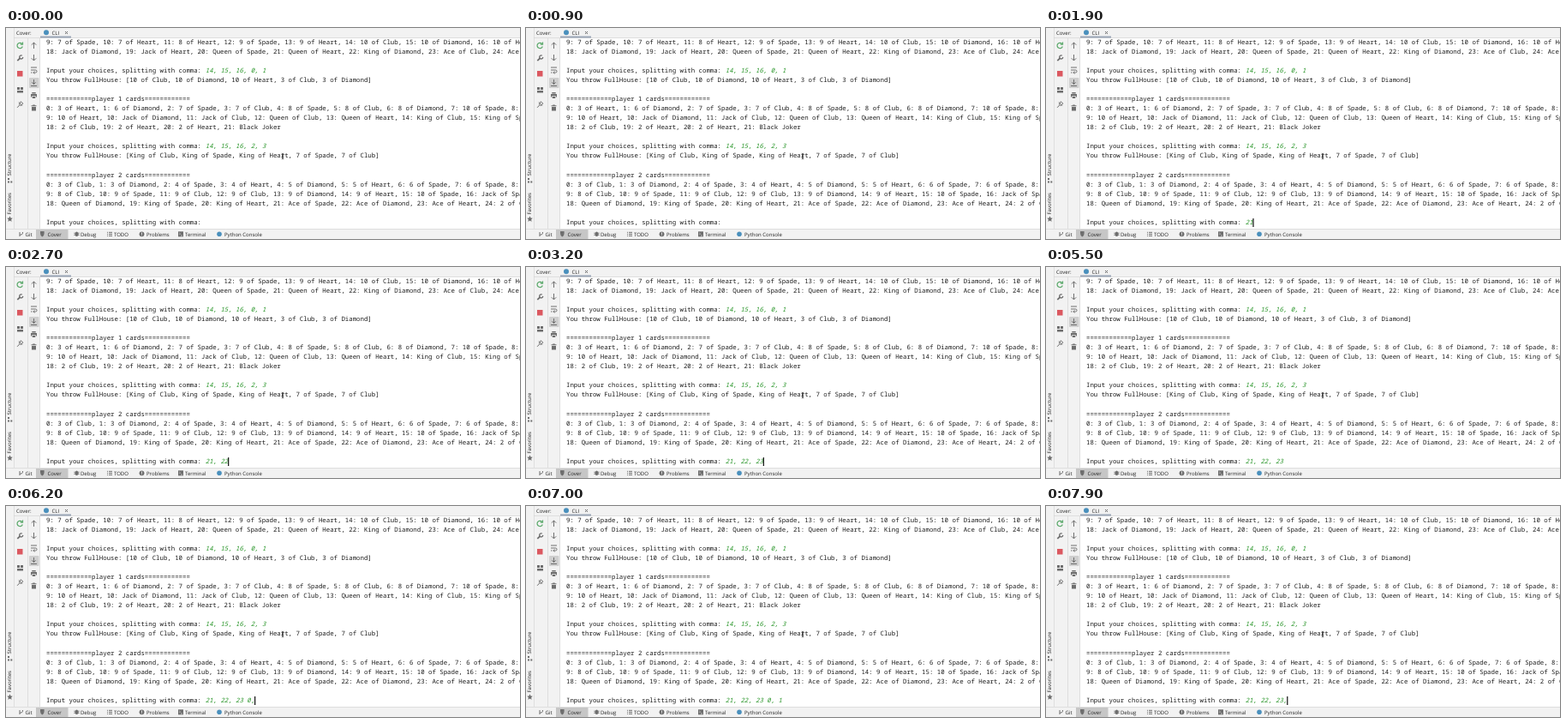
Write an HTML page that moves like this. It is 600 px wide and 246 px high and loops after 8000 ms.

```html
<!DOCTYPE html>
<html lang="en">
<head>
<meta charset="utf-8">
<style>
  html, body { margin: 0; width: 100%; height: 100%; overflow: hidden; background: #f2f2f2; }
  svg { display: block; }
  text { white-space: pre; text-rendering: geometricPrecision; }
  .console { font: 7.37px "Noto Sans Mono", monospace; fill: #1c1c1c; }
  .input { font-style: italic; fill: #259325; }
  .ui { font: 6px "Open Sans", sans-serif; fill: #222; }
  .icon { fill: none; stroke: #6e6e6e; stroke-width: 1; }
  .solid { fill: #6e6e6e; }
</style>
</head>
<body>
<svg width="600" height="246" viewBox="0 0 600 246">
  <rect width="600" height="246" fill="#f2f2f2"/>
  <rect x="40" y="12" width="560" height="222" fill="#fff"/>
  <path d="M9.5 0V234M25.5 12V234M39.5 12V234M9 11.5H600M0 234.5H600" stroke="#d6d6d6" stroke-width=".7"/>

  <!-- Header -->
  <g class="ui">
    <text x="12" y="7.5">Cover:</text>
    <text x="53.5" y="7.5">CLI</text>
    <circle cx="47" cy="5.3" r="3" fill="#4a90bd"/>
    <path class="icon" d="M69 4l3 3m0-3l-3 3" stroke-width=".6"/>
    <rect x="40" y="9.5" width="36" height="2" fill="#9ca7b8"/>
  </g>

  <!-- Run toolbars -->
  <g class="icon">
    <path d="M18.5 18.2A3.2 3.2 0 1 0 19.3 21.5M19.5 16.5v2.7h-2.7" stroke="#59a869" stroke-width="1.2"/>
    <path d="M13.3 38.2l3.4-3.4" stroke-width="1.8"/>
    <path d="M18.8 32.3a2 2 0 1 0 .9 1.6" stroke-width="1.3"/>
    <rect x="13" y="50" width="6.5" height="6.5" fill="#db5860" stroke="none"/>
    <path class="solid" stroke="none" d="M13 69h3v3h-3zM17 69h3v3h-3zM13 73h7v2.5h-7z"/>
    <path d="M15 86.5l4 4M17.4 85.7l2.4 2.4-2.5 2.7-2-2zM15.7 90l-2.6 2.8"/>
    <path d="M32.5 24v-7M29.8 19.7l2.7-2.7 2.7 2.7M32.5 31v7M29.8 35.3l2.7 2.7 2.7-2.7"/>
    <path d="M29 46h7M29 49h5.5a1.5 1.5 0 0 1 0 3H32M33.3 50.5L31.8 52l1.5 1.5M29 52h1.5"/>
    <rect x="27" y="58" width="11.5" height="12" rx="1" fill="#cfcfcf" stroke="none"/>
    <path d="M29 67.5h7M32.5 60v5.5M30.3 63.3l2.2 2.2 2.2-2.2"/>
    <path class="solid" stroke="none" d="M30.3 75h4.4v1.5h-4.4zM29 77h7v3.5h-1.3V79h-4.4v1.5H29zM30.8 79.7h3.4V82h-3.4z"/>
    <path class="solid" stroke="none" d="M29.5 90.3h1.8v-.8h2.4v.8h1.8v1h-6zM30 92h5v4.5h-5z"/>
  </g>

  <!-- Left stripe -->
  <g class="ui">
    <text transform="translate(6.3 172.5) rotate(-90)">Structure</text>
    <text transform="translate(6.3 217.5) rotate(-90)">Favorites</text>
    <path class="solid" d="M2 175h2v2H2zM2 178.5h2v2H2zM5.3 178.5h2v2h-2z"/>
    <path class="solid" d="M4.5 219.3l1 2.2 2.3.2-1.7 1.6.5 2.4-2.1-1.3-2.1 1.3.5-2.4-1.7-1.6 2.3-.2z"/>
  </g>

  <!-- Bottom stripe -->
  <rect x="35" y="235" width="37.5" height="11" fill="#c6c6c6"/>
  <g class="ui">
    <g id="tabs"></g>
    <g class="icon" stroke-width=".9">
      <path d="M16 238v5M19.5 238v1.3q0 1.7-3.5 2"/>
      <path class="solid" stroke="none" d="M40 237h4.6v2.5q0 2.6-2.3 4-2.3-1.4-2.3-4z"/>
      <path class="solid" stroke="none" d="M80.5 239q2-3 4 0v2.5q-2 3-4 0z"/>
      <path d="M79 239.2h7M79 241.3h7" stroke-width=".6"/>
      <path d="M118 238.3h1M120 238.3h4M118 240.3h1M120 240.3h4M118 242.3h1M120 242.3h4"/>
    </g>
    <circle cx="158.5" cy="240.3" r="2.9" fill="#6e6e6e"/>
    <path d="M158.5 238.5v2.2m0 .7v.8" stroke="#f2f2f2" stroke-width=".9"/>
    <rect x="201" y="237.3" width="6" height="6" fill="#6e6e6e"/>
    <path d="M202.2 238.8l1.3 1.2-1.3 1.2M204 242h2" fill="none" stroke="#f2f2f2" stroke-width=".6"/>
    <circle cx="249" cy="240.3" r="2.8" fill="#4a90bd"/>
  </g>

  <g id="console" class="console"></g>
  <rect id="caret" y="222" width="1.2" height="10" fill="#111"/>
  <path d="M321.8 146.2q1.2 0 1.2 1v4.6q0 1-1.2 1M324.2 146.2q-1.2 0-1.2 1v4.6q0 1 1.2 1" fill="none" stroke="#333" stroke-width=".8"/>
</svg>

<script>
const PROMPT = 'Input your choices, splitting with comma: ';
const LEFT = 47, FIRST_BASELINE = 18.6, LINE_HEIGHT = 11.07, ADVANCE = 7.37 * 0.6;
const LOOP = 8000;

const lines = [
  '9: 7 of Spade, 10: 7 of Heart, 11: 8 of Heart, 12: 9 of Spade, 13: 9 of Heart, 14: 10 of Club, 15: 10 of Diamond, 16: 10 of Heart',
  '18: Jack of Diamond, 19: Jack of Heart, 20: Queen of Spade, 21: Queen of Heart, 22: King of Diamond, 23: Ace of Club, 24: Ace of',
  '',
  PROMPT + '|14, 15, 16, 0, 1',
  'You throw FullHouse: [10 of Club, 10 of Diamond, 10 of Heart, 3 of Club, 3 of Diamond]',
  '',
  '============player 1 cards============',
  '0: 3 of Heart, 1: 6 of Diamond, 2: 7 of Spade, 3: 7 of Club, 4: 8 of Spade, 5: 8 of Club, 6: 8 of Diamond, 7: 10 of Spade, 8: 10',
  '9: 10 of Heart, 10: Jack of Diamond, 11: Jack of Club, 12: Queen of Club, 13: Queen of Heart, 14: King of Club, 15: King of Spade',
  '18: 2 of Club, 19: 2 of Heart, 20: 2 of Heart, 21: Black Joker',
  '',
  PROMPT + '|14, 15, 16, 2, 3',
  'You throw FullHouse: [King of Club, King of Spade, King of Heart, 7 of Spade, 7 of Club]',
  '',
  '============player 2 cards============',
  '0: 3 of Club, 1: 3 of Diamond, 2: 4 of Spade, 3: 4 of Heart, 4: 5 of Diamond, 5: 5 of Heart, 6: 6 of Spade, 7: 6 of Spade, 8: 7',
  '9: 8 of Club, 10: 9 of Spade, 11: 9 of Club, 12: 9 of Club, 13: 9 of Diamond, 14: 9 of Heart, 15: 10 of Spade, 16: Jack of Spade',
  '18: Queen of Diamond, 19: King of Spade, 20: King of Heart, 21: Ace of Spade, 22: Ace of Diamond, 23: Ace of Heart, 24: 2 of Club',
  '',
  PROMPT + '|'
];

const tabs = [['Git', 22.5], ['Cover', 48.5], ['Debug', 87], ['TODO', 126], ['Problems', 164],
  ['Terminal', 209], ['Python Console', 255]];

// Time of each keystroke and the number of characters left after it
const DRAFT = '21, 22, 23 0, 1';
const keys = [[0, 0], [1800, 1], [1900, 2], [2100, 3], [2200, 4], [2400, 5], [2500, 6],
  [2800, 7], [2900, 8], [3100, 9], [3200, 10], [3800, 11], [6000, 12], [6200, 13],
  [6400, 14], [6500, 15], [7100, 14], [7200, 13], [7400, 12], [7500, 11], [7700, 10], [7900, 11]];
const hiddenCaret = [[0, 400], [900, 1400], [3700, 3800], [4500, 5000], [5500, 6000], [7000, 7100]];

const byId = id => document.getElementById(id);

function addText(parent, content, x, y, className = '') {
  const node = document.createElementNS('http://www.w3.org/2000/svg', 'text');
  node.setAttribute('x', x);
  node.setAttribute('y', y);
  node.setAttribute('class', className);
  node.textContent = content;
  return parent.appendChild(node);
}

let typed;
lines.forEach((line, row) => {
  const [output, input] = line.split('|');
  const y = FIRST_BASELINE + row * LINE_HEIGHT;
  addText(byId('console'), output, LEFT, y);
  if (input !== undefined) {
    typed = addText(byId('console'), input, LEFT + output.length * ADVANCE, y, 'input');
  }
});
tabs.forEach(([label, x]) => addText(byId('tabs'), label, x, 242.5));

const caret = byId('caret');
const caretStart = LEFT + PROMPT.length * ADVANCE - 0.2;

function draw(now) {
  const t = now % LOOP;
  const count = keys.findLast(([time]) => time <= t)[1];
  // The final keystroke replaces the space with a comma
  const draft = t >= 7900 ? '21, 22, 23,' : DRAFT.slice(0, count);
  if (typed.textContent !== draft) typed.textContent = draft;
  caret.setAttribute('x', caretStart + count * ADVANCE);
  caret.setAttribute('visibility', hiddenCaret.some(([from, to]) => t >= from && t < to) ? 'hidden' : 'visible');
  requestAnimationFrame(draw);
}
draw(performance.now());
</script>
</body>
</html>
```
